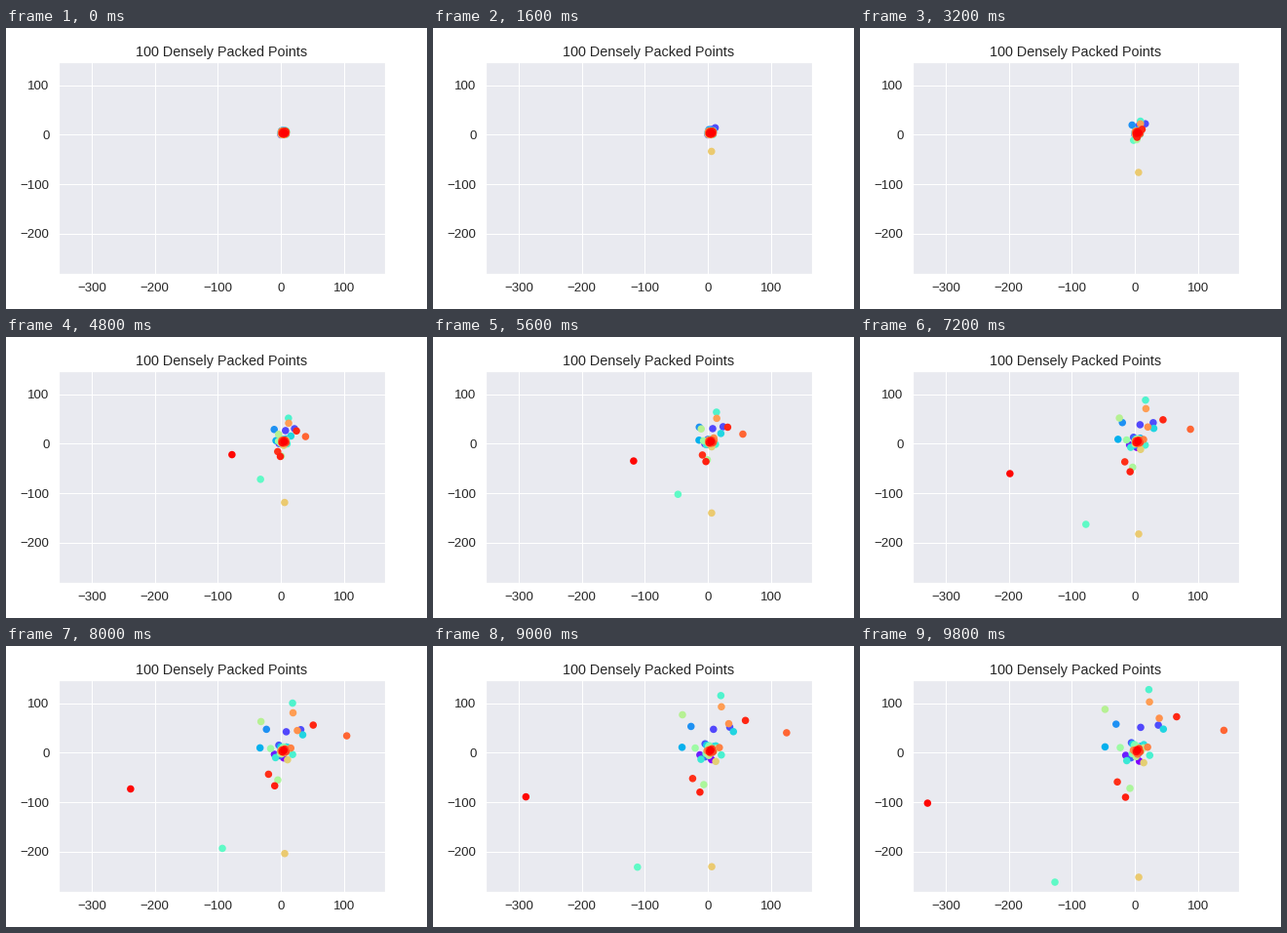
A matplotlib script that plays this animation: 432 by 288 pixels, repeating every 10 s.

```python
import numpy as np
import matplotlib.pyplot as plt
from matplotlib.animation import FuncAnimation

FRAMES = 50
INTERVAL = 200
LAST_STEP = FRAMES - 2
COUNT = 100
CLUSTER_SIZE = 8.5
CENTRE = np.array([5.5, 4.5])

# Points thrown far out: colour rank -> (start step, final x, final y)
ESCAPES = {
    9: (3.6, 9, 51.5),
    10: (0, 37, 56),
    19: (4, -30, 58),
    24: (16.4, -47.5, 12),
    31: (16, 45, 48),
    40: (8.4, 22, 128),
    43: (13.3, -127, -262),
    58: (9, -8, -72),
    60: (18.6, -47.5, 88),
    70: (0.4, 6, -252),
    78: (9, 23, 103),
    80: (25.3, 38.5, 70),
    86: (15.5, 141, 45.5),
    93: (12.8, -28, -59),
    94: (12.7, 66, 73),
    95: (12.4, -15, -90),
    98: (15, -329, -102),
}

plt.rcParams.update({
    "font.family": "Liberation Sans",
    "text.color": ".15",
})


def build_points():
    """Return home, start step and velocity of every point."""
    rng = np.random.default_rng(7)

    # Evenly scattered cluster from a low-discrepancy sequence
    rank = np.arange(COUNT)[:, None]
    home = CLUSTER_SIZE * (rank * [0.7549, 0.5698] % 1)

    # Most points drift slowly, only a few of them noticeably
    start = rng.uniform(8, 35, COUNT)
    speed = 0.9 * rng.random(COUNT) ** 4
    angle = rng.uniform(0, 2 * np.pi, COUNT)
    velocity = speed[:, None] * np.column_stack([np.cos(angle), np.sin(angle)])

    # Escaping points leave from the side of the cluster they head to
    for i, (begin, *end) in ESCAPES.items():
        path = end - CENTRE
        home[i] = CENTRE + 3 * path / np.hypot(*path)
        start[i] = begin
        velocity[i] = (end - home[i]) / (LAST_STEP - begin)
    return home, start, velocity


home, start, velocity = build_points()


def positions(step):
    moved = np.clip(step - start, 0, None)
    return home + velocity * moved[:, None]


fig, ax = plt.subplots(figsize=(6, 4), dpi=72, facecolor="white")
fig.subplots_adjust(left=0.125, right=0.9, bottom=0.125, top=0.88)
ax.set_facecolor("#E9EAF0")
ax.set_axisbelow(True)
ax.grid(True, color="white", linewidth=1)
for spine in ax.spines.values():
    spine.set(color="white", linewidth=1.25)

ax.set_xlim(-352.7, 164.8)
ax.set_ylim(-281.7, 148)
ax.set_xticks(range(-300, 101, 100))
ax.set_yticks(range(-200, 101, 100))
ax.tick_params(length=0, pad=9.5, labelsize=13.2, labelcolor=".15")
ax.set_title("100 Densely Packed Points", fontsize=14.4, pad=6)

colors = plt.get_cmap("rainbow")(np.linspace(0, 1, COUNT))
dots = ax.scatter(*positions(0).T, s=36, c=colors, linewidths=1.5)


def draw(frame):
    dots.set_offsets(positions(max(0, frame - 1)))
    return (dots,)


anim = FuncAnimation(fig, draw, frames=FRAMES, interval=INTERVAL,
                     repeat=True, repeat_delay=0)
plt.show()
```
